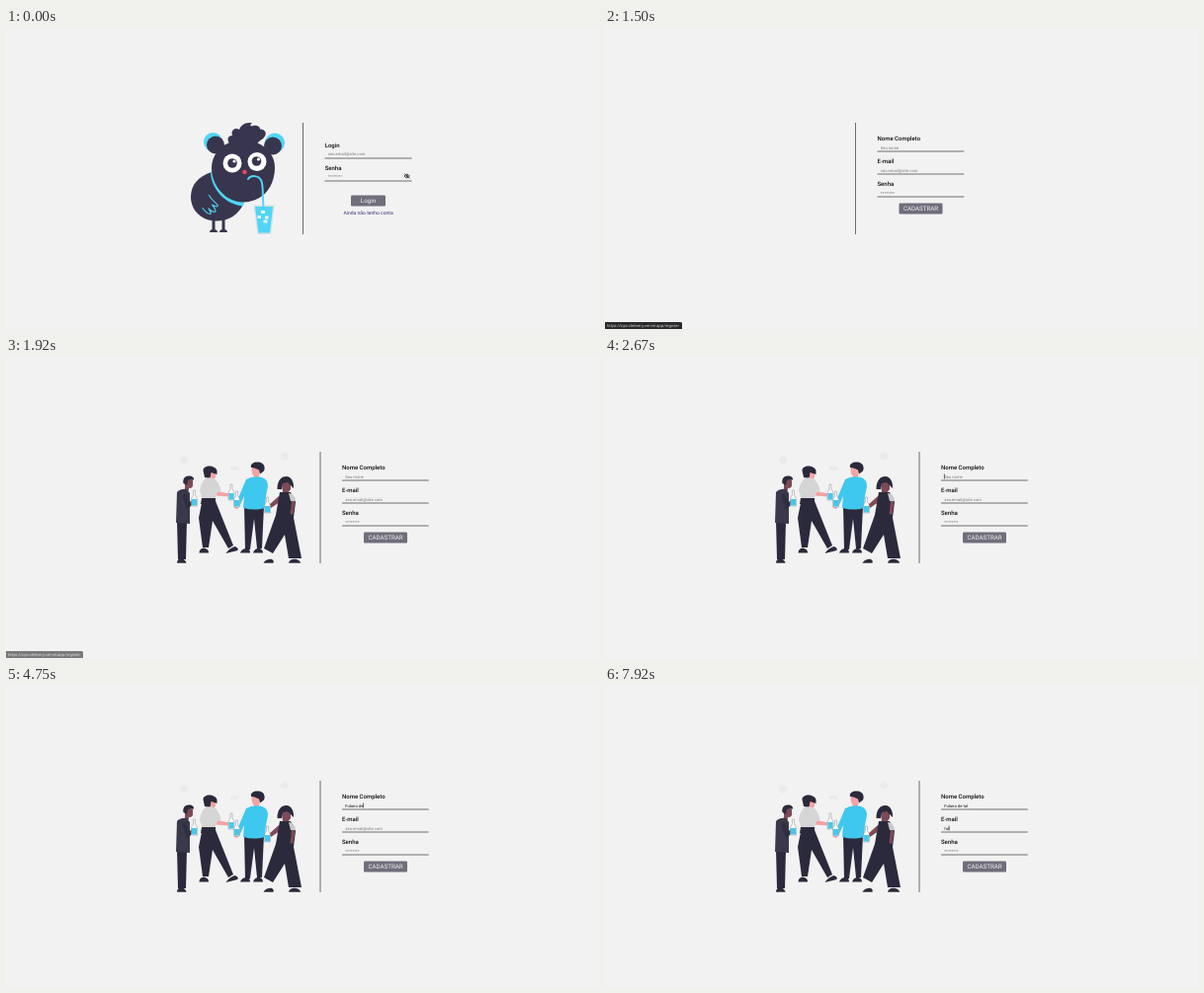
An HTML page that plays this animation: 600 px wide and 305 px high, repeating every 8000 ms.

```html
<!DOCTYPE html>
<html lang="pt-BR">
<head>
<meta charset="utf-8">
<title>Login e cadastro</title>
<style>
  html, body { margin: 0; width: 100%; height: 100%; overflow: hidden; background: #f2f2f2; }
  svg { display: block; width: 100%; height: 100%; }
  text { font-family: Roboto, sans-serif; text-rendering: geometricPrecision; white-space: pre; }
  .label { font-size: 6px; font-weight: 500; fill: #111; }
  .hint, .typed { font-size: 4.167px; fill: #7b7b7b; }
  .typed { fill: #111; }
  .button { font-size: 6.2px; fill: #f4f4f4; text-anchor: middle; }
  .link { font-size: 5.03px; fill: #3c2a78; }
  .status { font: 4px "Noto Sans", sans-serif; fill: #d8d8d8; }
  .rule { stroke: #4a4a4a; stroke-width: .8; }
  .ink { fill: #38364e; }
  .cyan { fill: #50d5f5; }
  .line { fill: none; stroke: #50d5f5; stroke-linecap: round; stroke-linejoin: round; }
  .night { fill: #2b2a3c; }
  .skin { fill: #f3a3a6; }
  .brown { fill: #7d4a56; }
</style>
</head>
<body>
<svg viewBox="0 0 600 305" preserveAspectRatio="none">
  <rect width="600" height="305" fill="#f2f2f2"/>

  <g id="login">
    <g id="mascot">
      <path class="ink" d="M208.5 192h3v12q2.500 .5 2.500 3h-8q0-2.500 2.500-3zM218.500 192h3v12q2.500 .5 2.500 3h-8q0-2.500 2.500-3z"/>
      <path class="ink" d="M208 146C195 150 187 159 187 171c0 14 11 24.500 26 24.500 12 0 22-6 27-17z"/>
      <path class="line" stroke-width="1.1" d="M205.500 169.500c3 6 8 8 9 10.500-1 2-4 0-6-1 2 3 4 5 3.500 7-2 1-5-1-7-3 1 2 3 4 2 5.500-3 0-6-3-8-6"/>
      <circle class="cyan" cx="209.500" cy="115.500" r="9.500"/>
      <circle class="cyan" cx="272" cy="116.500" r="10"/>
      <circle class="ink" cx="212" cy="118.500" r="9"/>
      <circle class="ink" cx="270" cy="119.500" r="9"/>
      <path class="cyan" d="M207 145c0 17 14 34 33 35.500l1-4z"/>
      <path class="ink" d="M208 142c0-16 14-28.500 31-28.500 19 0 33 12 33 28 0 20-13 35-32 35-18 0-32-17-32-34.500z"/>
      <path class="ink" d="M227 118c-4-4-3-9 2-9-2-5 3-9 7-6 2-5 7-8 13-6.500-2 1-2 2-1 3 5-2 9 0 9 3 5 0 7 4 5 7-2 4-6 4-8 8z"/>
      <circle cx="229" cy="137" r="9.500" fill="#fff"/>
      <circle cx="254" cy="135.500" r="9.500" fill="#fff"/>
      <circle class="ink" cx="229" cy="137" r="4.800"/>
      <circle class="ink" cx="253.500" cy="135" r="4.800"/>
      <circle cx="231" cy="135" r="1.600" fill="#fff"/>
      <circle cx="255.500" cy="133" r="1.600" fill="#fff"/>
      <circle cx="241.500" cy="146" r="2.200" fill="#f0465a"/>
      <path d="M250.500 179.500h21l-3.500 29.500h-13.500z" fill="#d5e0e4"/>
      <path class="cyan" d="M252 181h18l-3 26.500h-11.500z"/>
      <path class="line" stroke-width="2" d="M245 153c3-4 10-4 13 1 3 6 1 16 2.500 26"/>
      <path d="M258 185h4v3h-4zM254.500 190h3.500v3h-3.500zM262 190.500h3.500v3h-3.500zM260.500 194.500h4v3h-4z" fill="#e4f7fc"/>
    </g>
    <path class="rule" d="M300.500 96V209M322.500 132h88M322.500 155h88"/>
    <text class="label" x="322.700" y="121">Login</text>
    <text class="hint" x="325.800" y="129.300">seu.email@site.com</text>
    <text class="label" x="322.700" y="144">Senha</text>
    <text class="hint" x="325.800" y="152.400">********</text>
    <g fill="none" stroke="#222" stroke-width=".8">
      <path d="M403 150q2.700-3.600 5.400 0q-2.700 3.600-5.400 0M403.300 147.500l5 5"/>
      <circle cx="405.700" cy="150" r=".8"/>
    </g>
    <rect x="349" y="169.500" width="35" height="11" rx="1.200" fill="#706e7b"/>
    <text class="button" x="366.500" y="177.300">Login</text>
    <text class="link" x="341.500" y="188.700">Ainda não tenho conta</text>
    <path id="underline" d="M341.500 189.500h50.500" stroke="#3c2a78" stroke-width=".6"/>
  </g>

  <g id="register">
    <g id="friends">
      <g fill="#ebebeb">
        <circle cx="180" cy="104.500" r="4"/>
        <path d="M227 111h8v4h-8z"/>
        <circle cx="282" cy="100.500" r="4"/>
      </g>
      <!-- man in a suit -->
      <path class="brown" d="M181 125h8v6q-2 3-4 1.500v3h-4z"/>
      <path class="night" d="M179.500 128c-1-5 2-8 6-7.500 3 0 5 2 4.500 4l-6 .5-1 5z"/>
      <path class="night" d="M173 166h10l-1 39h-8zM173 208.700q0-4.500 5-4.500 4 1.500 4.500 4.500z"/>
      <path d="M173 137q4-4 10-3l3 4 0 31-14-1z" fill="#3a394b"/>
      <path d="M180 139l4 12 6-5" fill="none" stroke="#302f41" stroke-width="4"/>
      <circle class="brown" cx="190" cy="145" r="1.800"/>
      <!-- woman in a blouse -->
      <path class="skin" d="M204 116h8l0 6-3 3h-5zM214 136l12 2.500v3l-14-1z"/>
      <path class="night" d="M199.500 115c0-6 12-6 14 0v4l-6-2-1 6-5.500-1z"/>
      <path d="M202 123q6-2 10 1 5 6 5.500 12l-5 2-.5 6h-14q0-5-2-8 1-9 6-13z" fill="#d6d5d5"/>
      <path class="night" d="M198 148l14-2 8 20 10 25-5 3-16-28-4 27h-6l-4-30zM195.500 198.500q0-4.500 5-5 5 1.500 4.500 5zM222.500 199q3-5 9-7 4 1 3 4z"/>
      <path class="night" d="M198 143h14v6h-15z"/>
      <!-- man in a sweater -->
      <path class="skin" d="M248.500 112h8v7l-1 4h-5v-3q-2-1-2-8z"/>
      <path class="night" d="M248 112c-1-4 3-6 7-5.500 5 0 8 4 6 9l-4 3-1-4q-5-3-8-2.500z"/>
      <path class="night" d="M241 151h20l-2 43h-5l-3-30-4 31h-5zM237 198.500q1-4 7-5 3 1.500 3 5zM250 198.500q1-4 6-5 4 1.500 4 5z"/>
      <path d="M243 124q7-4 16-2 6 2 6 9l-2 10-1 12q-10 3-22 0l1-12-5 11-4-2z" fill="#3fc8ef"/>
      <path class="skin" d="M232 149l4 2-2 3-3-1z"/>
      <!-- woman in overalls -->
      <path class="brown" d="M279 126h9v8l-3 4h-5zM276 141l-10 9 2 3 12-8z"/>
      <path class="night" d="M274.500 134c0-9 4-13 9-13 6 0 8 7 7.500 12l-6-6-5 1-1 6z"/>
      <path class="night" d="M277 137h11l5 10-2 16 8 41h-13l-4-24-12 19-9-5 12-34z"/>
      <path d="M286 138q6 0 7 8h-5z" fill="#cbcaca"/>
      <path class="brown" d="M289 146h3.500l-2 14-3-1z"/>
      <path class="night" d="M260.500 208.700q2-4 8-4 3 1 2 4zM286 208.700q1-4.500 7-4 5 1.500 5 4z"/>
      <g id="bottles"></g>
    </g>
    <path class="rule" d="M318 96V209M340 125h87.700M340 148h87.700M340 171h87.700"/>
    <text class="label" x="340" y="114">Nome Completo</text>
    <text class="label" x="340" y="137">E-mail</text>
    <text class="label" x="340" y="160.300">Senha</text>
    <text class="hint" x="343.300" y="168.800">********</text>
    <g id="name"><text class="hint" x="343.300" y="122.500">Seu nome</text><text class="typed" x="343.300" y="122.500"></text><path d="M0 118.500v5" stroke="#111" stroke-width=".6"/></g>
    <g id="email"><text class="hint" x="343.300" y="145.500">seu.email@site.com</text><text class="typed" x="343.300" y="145.500"></text><path d="M0 141.500v5" stroke="#111" stroke-width=".6"/></g>
    <rect x="362" y="177.500" width="44" height="11" rx="1.200" fill="#706e7b"/>
    <text class="button" x="384" y="185.300">CADASTRAR</text>
  </g>

  <g id="status">
    <path d="M0 298h76.500q1.500 0 1.500 1.500V305H0z" fill="#292929"/>
    <text class="status" x="1.800" y="303">https://sips-delivery.vercel.app/register</text>
  </g>
</svg>
<script>
const LOOP = 8000;
const $ = id => document.getElementById(id);
const show = (node, on) => node.style.display = on ? '' : 'none';
// Last value of a [time, value, ...] step table reached at t.
const stepAt = (steps, t) => steps.filter(([at]) => at <= t).pop()[1];
const within = (spans, t) => spans.some(([from, to]) => t >= from && t < to);

const statusSteps = [[0, 0], [580, .5], [670, .9], [830, 1], [1920, .6], [2000, .3], [2080, 0]];
const fields = [
  { id: 'name', text: 'Fulano de tal', carets: [[2670, 3250], [3420, 6170]],
    keys: [3420, 3580, 3830, 4000, 4170, 4330, 4500, 4670, 4750, 5250, 5250, 5330, 5580] },
  { id: 'email', text: 'ful', carets: [[6420, 7000], [7500, LOOP]], keys: [7500, 7670, 7920] }
];

$('bottles').innerHTML = [[190.500, 135], [228, 129], [233.500, 136], [264.500, 142]].map(([x, y]) =>
  `<g transform="translate(${x} ${y})">
    <path d="M-1 0h2v5q2 2 2 4v7h-6v-7q0-2 2-4z" fill="#f7f7f7" stroke="#777783" stroke-width=".4"/>
    <path d="M-2.500 9h5v6.500h-5z" fill="#45c8ea"/>
  </g>`).join('');

function drawField({ id, text, keys, carets }, t) {
  const [hint, typed, caret] = $(id).children;
  const value = text.slice(0, keys.filter(at => at <= t).length);
  if (typed.textContent !== value) typed.textContent = value;
  show(hint, !value);
  show(caret, within(carets, t));
  const width = value ? typed.getComputedTextLength() : 0;
  caret.setAttribute('transform', `translate(${343.4 + width} 0)`);
}

function draw(now) {
  const t = now % LOOP;
  show($('login'), t < 1500);
  show($('underline'), t >= 420);
  show($('register'), t >= 1500);
  show($('friends'), t >= 1920);
  // The form is centred alone until the picture has loaded.
  $('register').setAttribute('transform', `translate(${t < 1920 ? -64.5 : 0} 0)`);
  $('status').style.opacity = stepAt(statusSteps, t);
  if (t >= 1500) fields.forEach(field => drawField(field, t));
}

const start = performance.now();
function tick() {
  draw(performance.now() - start);
  requestAnimationFrame(tick);
}
tick();
</script>
</body>
</html>
```
